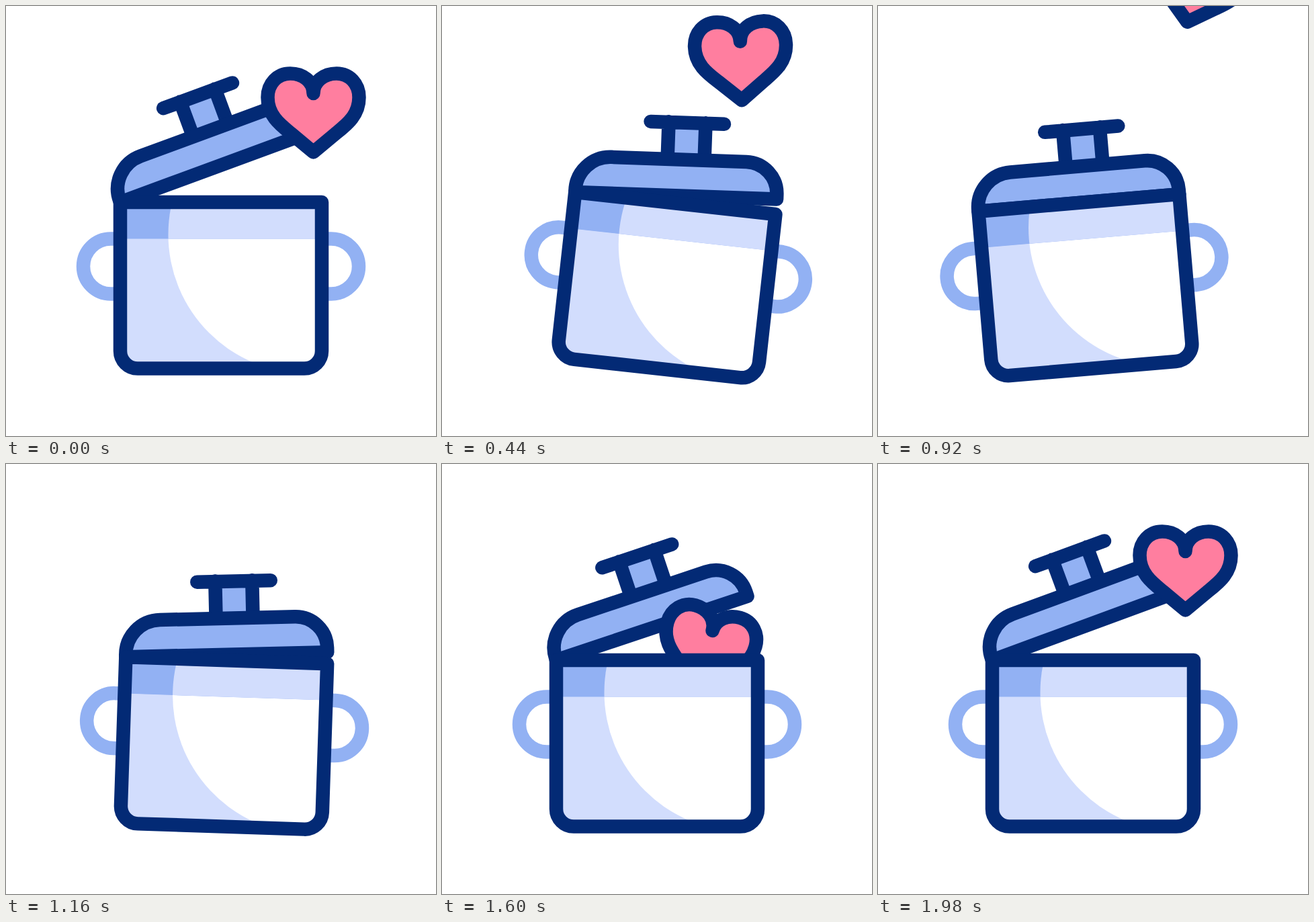
Write an HTML page that moves like this. It is 640 px wide and 640 px high and loops after 2.08 s.

```html
<!DOCTYPE html>
<html lang="en">
<head>
<meta charset="utf-8">
<title>Cooking pot with heart</title>
<style>
  html, body { margin: 0; width: 100%; height: 100%; overflow: hidden; background: #fff; }
  svg { display: block; width: 100%; height: 100%; }
  .line { fill: none; stroke: #032a75; stroke-width: 20.5; stroke-linecap: round; stroke-linejoin: round; }
  .blue { fill: #92b1f3; }
  .pale { fill: #d2ddfd; }
  .white { fill: #fff; }
  .pink { fill: #ff7e9f; }
  .handle { fill: none; stroke: #92b1f3; stroke-width: 20.5; }
</style>
</head>
<body>
<svg viewBox="0 0 640 640">
  <defs>
    <path id="body" d="M170 292H470V513.5A26 26 0 0 1 444 539.5H196A26 26 0 0 1 170 513.5Z"/>
    <clipPath id="inside"><use href="#body"/></clipPath>
    <clipPath id="band"><rect x="170" y="292" width="300" height="54.5"/></clipPath>
  </defs>

  <g class="tilt">
    <path class="handle" d="M165 346.5H156A41 41 0 0 0 156 428.5H165M475 346.5H484A41 41 0 0 1 484 428.5H475"/>
    <g id="lid">
      <path class="blue" d="M305.5 183H360.5V238H305.5Z"/>
      <path class="line" d="M278.5 183H388M305.5 182.5V238M360.5 182.5V238"/>
      <path class="line" style="fill:#92b1f3" d="M170 292V290A52 52 0 0 1 222 238H423A47 47 0 0 1 470 285V292Z"/>
    </g>
  </g>

  <!-- Centred on its own origin -->
  <path id="heart" class="line" style="fill:#ff7e9f"
    d="M0 -30C0 -48 -16 -59.5 -34.5 -59.5C-53.5 -59.5 -68 -44.5 -68 -24C-68 3 -49 17 -33 30L0 57.5L33 30C49 17 68 3 68 -24C68 -44.5 53.5 -59.5 34.5 -59.5C16 -59.5 0 -48 0 -30Z"/>

  <g class="tilt">
    <g clip-path="url(#inside)">
      <rect class="pale" x="170" y="292" width="300" height="248"/>
      <circle class="white" cx="448.5" cy="340" r="207"/>
      <g clip-path="url(#band)">
        <rect class="blue" x="170" y="292" width="300" height="55"/>
        <circle class="pale" cx="448.5" cy="340" r="207"/>
      </g>
    </g>
    <use href="#body" class="line"/>
  </g>
</svg>
<script>
const LOOP = 2080;

// Keys are [time, value]
const potAngle = [[270, 0], [560, 10], [900, -5], [1180, 2], [1400, 0]];
const lidAngle = [[160, -20.2], [560, 0], [965, 0], [1740, -20.2]];

// Keys are [time, x, y, angle]
const flyAway = [[0, 457.5, 160, 0], [240, 435.7, 121.8, -7.5], [440, 444.6, 83, -1.6],
                 [720, 471.5, 22, 18], [1080, 474, -75, 12], [1200, 474, -100, 12]];
const rise = [[1220, 385, 394, 10], [1600, 394.4, 277.2, 15.6], [1980, 457.5, 160, 0]];

// Slope at a key: flat at the ends and at turning points
function slope(keys, i, c) {
  const a = keys[i - 1], b = keys[i], d = keys[i + 1];
  if (!a || !d || (b[c] - a[c]) * (d[c] - b[c]) <= 0) return 0;
  return (d[c] - a[c]) / (d[0] - a[0]);
}

// Smooth cubic through the keys, held before the first and after the last
function at(keys, t, c = 1) {
  const last = keys.length - 1;
  if (t <= keys[0][0]) return keys[0][c];
  if (t >= keys[last][0]) return keys[last][c];
  const i = keys.findIndex(k => k[0] > t) - 1;
  const a = keys[i], b = keys[i + 1], span = b[0] - a[0];
  const u = (t - a[0]) / span, s = u * u * (3 - 2 * u);
  return a[c] + (b[c] - a[c]) * s
    + span * u * (1 - u) * ((1 - u) * slope(keys, i, c) - u * slope(keys, i + 1, c));
}

const heart = document.getElementById("heart");
const lid = document.getElementById("lid");
const tilted = document.querySelectorAll(".tilt");

function draw(t) {
  const path = t < 1200 ? flyAway : rise;
  const [x, y, angle] = [1, 2, 3].map(c => at(path, t, c));
  heart.setAttribute("transform", `translate(${x} ${y}) rotate(${angle})`);
  lid.setAttribute("transform", `rotate(${at(lidAngle, t)} 170 292)`);
  for (const g of tilted) g.setAttribute("transform", `rotate(${at(potAngle, t)} 320 540)`);
}

const start = performance.now();
function frame() {
  draw((performance.now() - start) % LOOP);
  requestAnimationFrame(frame);
}
frame();
</script>
</body>
</html>
```
